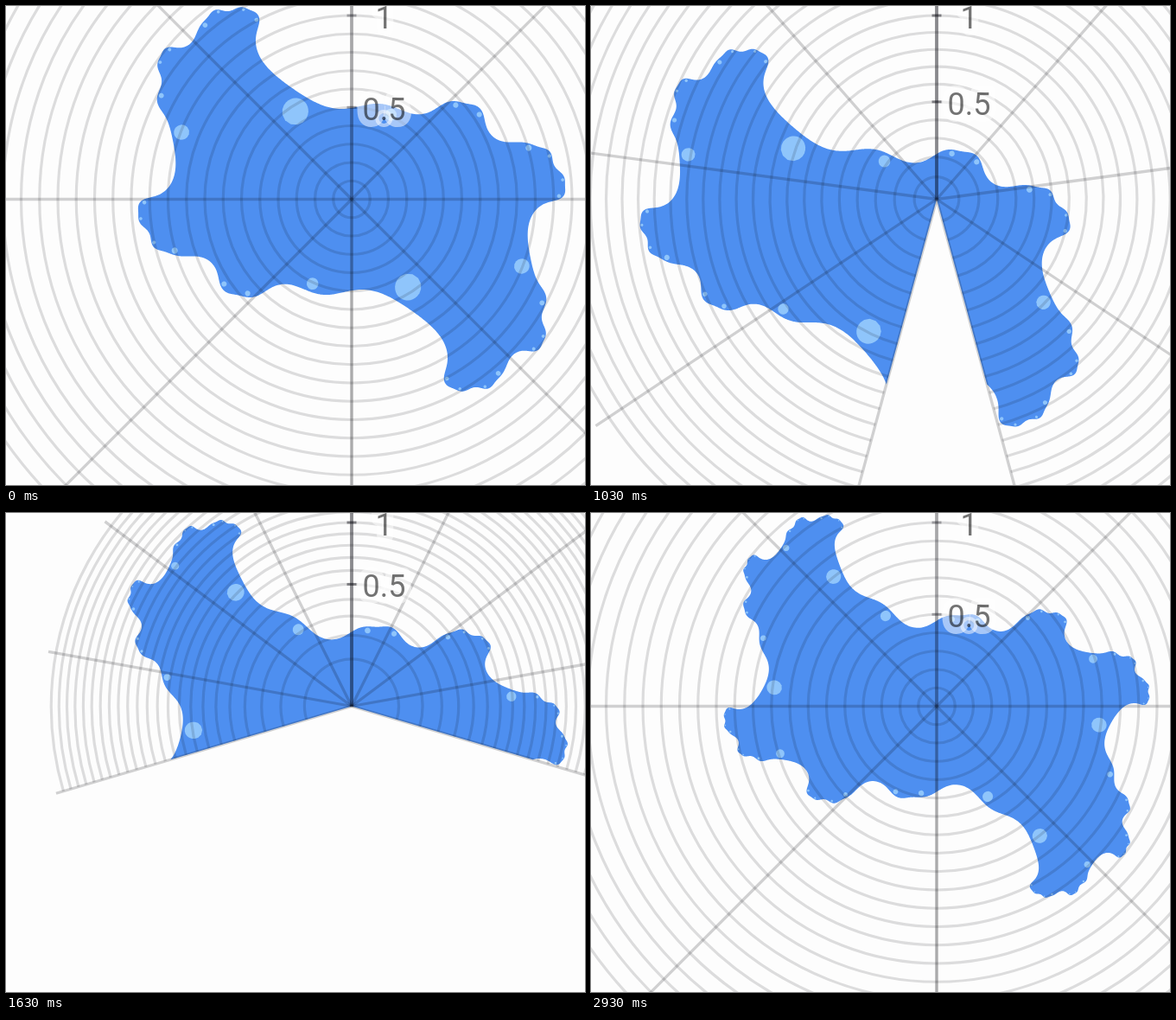
Animation, 670 px wide and 554 px high, one loop 3.84 s. Source, as an HTML page with a canvas:

```html
<!DOCTYPE html>
<html lang="en">
<head>
<meta charset="utf-8">
<title>Folding a plane</title>
<style>
html, body { margin: 0; width: 100%; height: 100%; overflow: hidden; background: #fdfdfd; }
canvas { display: block; }
</style>
</head>
<body>
<canvas id="stage" width="670" height="554"></canvas>
<script>
const W = 670, H = 554, LOOP = 3840;
const CX = 400, CY = 223.5, UNIT = 212.5;
const C = { re: 0.295, im: -0.487 };
const TAU = 2 * Math.PI;
const ctx = document.getElementById('stage').getContext('2d');

const clamp = x => Math.min(1, Math.max(0, x));
const span = (t, a, b) => clamp((t - a) / (b - a));
const smooth = s => (1 - Math.cos(Math.PI * s)) / 2;
const negate = pts => pts.map(z => ({ re: -z.re, im: -z.im }));
const shift = (pts, k) => pts.map(z => ({ re: z.re - C.re * k, im: z.im - C.im * k }));

function circle(re, im, r, n) {
  return Array.from({ length: n }, (_, i) => ({
    re: re + r * Math.cos(TAU * i / n),
    im: im + r * Math.sin(TAU * i / n)
  }));
}

// Square root of (z - c) along a curve, staying on one continuous branch.
function rootCurve(pts) {
  let last = null;
  return pts.map(z => {
    const x = z.re - C.re, y = z.im - C.im;
    const r = Math.sqrt(Math.hypot(x, y)), a = Math.atan2(y, x) / 2;
    let w = { re: r * Math.cos(a), im: r * Math.sin(a) };
    if (last && w.re * last.re + w.im * last.im < 0) w = { re: -w.re, im: -w.im };
    return last = w;
  });
}

function unfold(shape) {
  const half = rootCurve(shape.edge);
  return {
    edge: half.concat(negate(half)),
    dots: shape.dots.flatMap(d => {
      const w = rootCurve(d);
      return [w, negate(w)];
    })
  };
}

// A disc of radius 2 with a spot halfway out on the diagonal, unfolded five times.
let first = {
  edge: circle(0, 0, 2, 72),
  dots: [circle(Math.SQRT1_2, Math.SQRT1_2, 0.6, 24)]
};
for (let i = 0; i < 5; i++) first = unfold(first);
const second = unfold(first);

// Polar form with the angle kept continuous from point to point.
function polar(pts) {
  let last = null;
  return pts.map(z => {
    let a = Math.atan2(z.im, z.re);
    if (last !== null) a += TAU * Math.round((last - a) / TAU);
    last = a;
    return { r: Math.hypot(z.re, z.im), a };
  });
}

const power = (pts, p) => pts.map(q => {
  const r = Math.pow(q.r, p);
  return { re: r * Math.cos(q.a * p), im: r * Math.sin(q.a * p) };
});

// Opens a closed curve at the downward ray and ends both sides in the origin.
function cutOpen(pts) {
  const n = pts.length;
  const start = pts.findIndex((z, i) => {
    const prev = pts[(i + n - 1) % n];
    return prev.im > 0 && z.im <= 0 && z.re < 0;
  });
  if (start < 0) return polar(pts);
  const list = pts.slice(start).concat(pts.slice(0, start));
  const a = list[n - 1], b = list[0];
  const k = a.im / (a.im - b.im);
  const r = -(a.re + (b.re - a.re) * k);
  return [{ r: 0, a: 0 }, { r, a: -Math.PI }, ...polar(list), { r, a: Math.PI }];
}

function bend(shape, p) {
  return {
    edge: power(cutOpen(shape.edge), p),
    dots: shape.dots.map(d => power(polar(d), p))
  };
}

function trace(pts) {
  pts.forEach(z => ctx.lineTo(CX - z.im * UNIT, CY - z.re * UNIT));
  ctx.closePath();
}

function drawShape(shape, alpha = 1) {
  ctx.globalAlpha = alpha;
  ctx.fillStyle = '#4e8ff0';
  ctx.beginPath();
  trace(shape.edge);
  ctx.fill();
  ctx.fillStyle = '#8fc5fb';
  for (const d of shape.dots) {
    ctx.beginPath();
    trace(d);
    ctx.fill();
  }
  ctx.globalAlpha = 1;
}

function line(x1, y1, x2, y2, width, alpha) {
  ctx.lineWidth = width;
  ctx.strokeStyle = `rgba(0,0,10,${alpha})`;
  ctx.beginPath();
  ctx.moveTo(x1, y1);
  ctx.lineTo(x2, y2);
  ctx.stroke();
}

function drawLabel(text, y) {
  ctx.lineWidth = 16;
  ctx.strokeStyle = 'rgba(255,255,255,.5)';
  ctx.strokeText(text, 437.5, y + 15);
  ctx.fillStyle = 'rgba(0,0,0,.55)';
  ctx.fillText(text, 437.5, y + 15);
}

function drawGrid(p, alpha, axis) {
  if (alpha <= 0) return;
  ctx.globalAlpha = alpha;
  ctx.lineWidth = 3.2;
  ctx.strokeStyle = 'rgba(0,0,10,.13)';
  for (let i = 1; i <= 23; i++) {
    ctx.beginPath();
    ctx.arc(CX, CY, UNIT * Math.pow(i / 10, p), -Math.PI * (0.5 + p), Math.PI * (p - 0.5));
    ctx.stroke();
  }
  const reach = UNIT * Math.pow(2.4, p);
  for (let i = -4; i <= 4; i++) {
    const a = i * Math.PI / 4 * p;
    line(CX, CY, CX - reach * Math.sin(a), CY - reach * Math.cos(a), 3.3, 0.18);
  }
  line(CX, CY, CX, 0, 4, axis);
  for (const v of [0.5, 1]) {
    const y = CY - UNIT * Math.pow(v, p);
    line(CX - 5.5, y, CX + 5.5, y, 3, axis + 0.1);
    drawLabel(String(v), y);
  }
  ctx.globalAlpha = 1;
}

function draw(time) {
  // The picture advances in steps of a tenth of a second.
  const t = time < 30 ? 0 : 30 + 100 * Math.floor((time - 30) / 100);
  const slide = smooth(span(t, 0, 460));
  const p = 1 - smooth(span(t, 670, 2005)) / 2;
  const copy = span(t, 2130, 2430);
  const back = span(t, 2530, 2930);

  ctx.fillStyle = '#fdfdfd';
  ctx.fillRect(0, 0, W, H);

  if (copy >= 1) {
    drawShape(second);
    drawGrid(1, back, 0.2);
    return;
  }
  const moved = {
    edge: shift(first.edge, slide),
    dots: first.dots.map(d => shift(d, slide))
  };
  const shape = p < 1 ? bend(moved, p) : moved;
  if (copy > 0) drawShape({ edge: negate(shape.edge), dots: shape.dots.map(negate) }, copy);
  drawShape(shape);
  drawGrid(p, 1 - copy, 0.2 + 0.14 * slide);
}

ctx.font = '36px Roboto, sans-serif';
ctx.textAlign = 'center';
ctx.lineJoin = 'round';

const begin = performance.now();
function tick() {
  draw((performance.now() - begin) % LOOP);
  requestAnimationFrame(tick);
}
tick();
</script>
</body>
</html>
```
